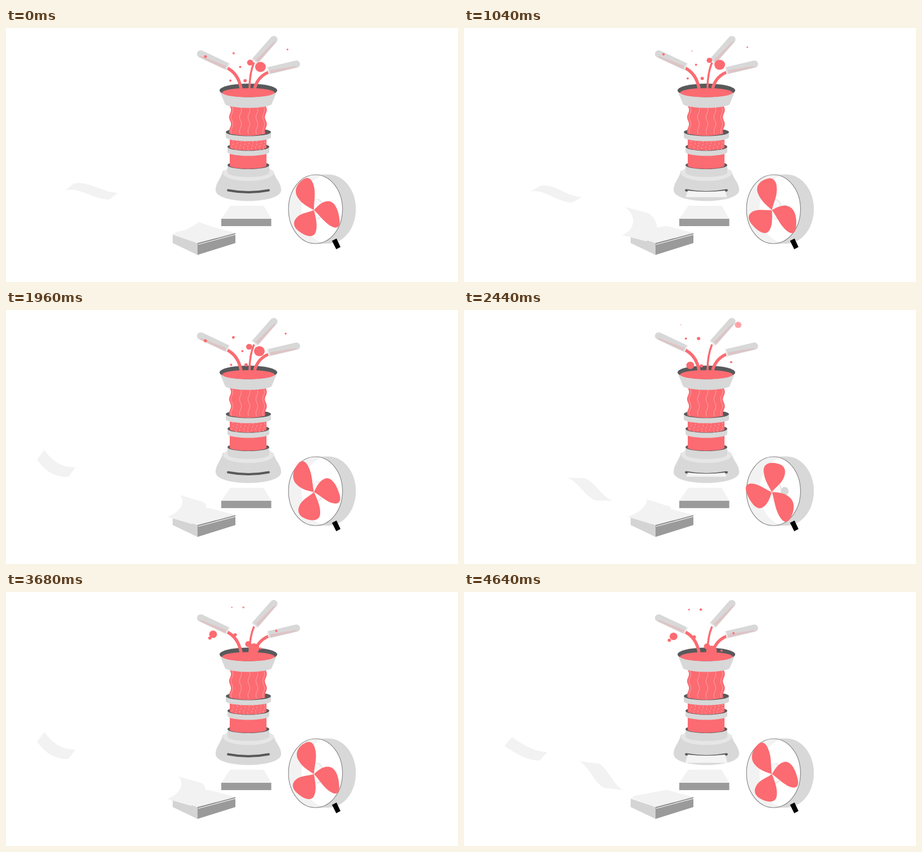
An HTML page with a canvas that plays this animation: 800 by 450 pixels, repeating every 4680 ms.

```html
<!DOCTYPE html>
<html>
<head>
<meta charset="utf-8">
<style>
  html, body { margin: 0; height: 100%; overflow: hidden; background: #fff; }
  canvas { display: block; }
</style>
</head>
<body>
<canvas id="stage" width="800" height="450"></canvas>
<script>
const ctx = document.getElementById('stage').getContext('2d');
const LOOP = 4680, DROP_CYCLE = 1000, PAPER_CYCLE = 1700, RISE_SPEED = 0.097;
const RED = '#fb6b71', GREY = '#d8d8d8', DARK = '#58595b', PAPER = '#f2f2f2';

const drops = [
  { start: 320, end: 1120, x: 472, drift: 36, r: 2 },
  { start: 450, end: 1120, x: 378, drift: -24, r: 3 },
  { start: 380, end: 900, x: 411, drift: -60, r: 7 },
  { start: 390, end: 1070, x: 424, drift: -20, r: 3 },
  { start: 560, end: 1160, x: 433, drift: 9, r: 5.5 },
  { start: 640, end: 1490, x: 438, drift: 52, r: 9.5 },
  { start: 890, end: 1740, x: 428, drift: -6, r: 3 },
  { start: 890, end: 1740, x: 401, drift: 1, r: 2 },
  { start: 640, end: 1480, x: 456, drift: -74, r: 2 }
];

// Poses of a sheet: four points of one edge, then the offset to the other edge
const poses = [
  { time: -860, shape: [356, 351, 340, 355, 320, 360, 297, 365, 44, 16] }, // flat on the pile
  { time: -300, shape: [285, 317, 310, 335, 300, 360, 280, 367, 42, 11] }, // curled up
  { time: -100, shape: [205, 300, 222, 310, 232, 340, 248, 347, 34, 4] },  // blown off
  { time: 360, shape: [105, 288, 130, 281, 155, 304, 183, 304, 15, -12] }, // gliding
  { time: 570, shape: [55, 265, 71, 288, 89, 296, 110, 296, 13, -17] }     // floating
];

const clamp = v => Math.max(0, Math.min(1, v));

function sheetShape(time) {
  const i = Math.max(1, poses.findIndex(p => p.time > time) + 1 || poses.length) - 1;
  const a = poses[Math.max(0, i - 1)], b = poses[Math.min(i, poses.length - 1)];
  const k = clamp((time - a.time) / (b.time - a.time || 1));
  return a.shape.map((v, j) => v + (b.shape[j] - v) * k);
}

function fill(path, color) {
  ctx.fillStyle = color;
  ctx.fill(new Path2D(path));
}

function line(path, color, width, cap = 'butt') {
  ctx.strokeStyle = color;
  ctx.lineWidth = width;
  ctx.lineCap = cap;
  ctx.stroke(new Path2D(path));
}

function oval(x, y, rx, ry, color) {
  ctx.beginPath();
  ctx.ellipse(x, y, rx, ry, 0, 0, Math.PI * 2);
  ctx.fillStyle = color;
  ctx.fill();
}

function tube(x, y, angle, length, side) {
  ctx.save();
  ctx.translate(x, y);
  ctx.rotate(angle);
  fill(`M0 -6.5H${length}V6.5H0A6.5 6.5 0 0 1 0 -6.5Z`, GREY);
  fill(`M3 ${side * 3}L${length - 3} 0V${side * 5.5}H0Z`, '#dec3c5');
  line(`M${length} -7V7`, '#ececec', 2);
  ctx.restore();
}

function wavyEdge(x, from, to) {
  const points = [], step = Math.sign(to - from);
  for (let y = from; y !== to + step; y += step)
    points.push(`${x + 1.7 * Math.sin((y - 139) * 0.25)} ${y}`);
  return points.join('L');
}

function ring(y, rx, ry) {
  const l = 429 - rx, r = 429 + rx;
  fill(`M${l} ${y}V${y + 9}A${rx} ${ry} 0 0 0 ${r} ${y + 9}V${y}Z`, GREY);
  oval(429, y, rx, ry, DARK);
}

function column(top, bottom) {
  fill(`M396 ${top}V${bottom}A33 6 0 0 0 461 ${bottom}V${top}Z`, RED);
}

function drawMachine(t) {
  // Base
  fill('M384 253C380 268 371 274 371 287C371 313 487 313 487 287C487 274 477 268 473 253Z', GREY);
  oval(429, 257, 45, 14, '#e6e6e6');
  ring(243, 37, 7);
  fill('M392 245V256A37 8 0 0 0 466 256V245A37 7 0 0 1 392 245Z', GREY);
  column(215, 244.5);
  ring(210.5, 37, 7);
  column(190, 212);

  ctx.save();
  ctx.setLineDash([3, 3]);
  for (let i = 0; i < 9; i++) {
    ctx.lineDashOffset = i * 2 - t * 0.024;
    line(`M${401 + i * 7} 199q3 5 0 9t0 9`, '#fdaeb1', 1);
  }
  ctx.restore();

  ring(184.5, 40, 7);
  fill(`M${wavyEdge(396.5, 135, 187)}Q429 195 460 187L${wavyEdge(460, 187, 135)}Z`, RED);
  for (const x of [400, 415, 430, 444, 456])
    line('M' + wavyEdge(x, 138, 188), '#fda0a4', 1);

  // Funnel
  fill('M378 111L388 135.500C402 143.500 456 143.500 470 135.500L480 111Z', GREY);
  oval(429, 110.5, 51, 12, DARK);
  oval(429, 114.5, 46.5, 8, RED);

  line('M393 287.500Q429 294.500 465 287.500', DARK, 4, 'round');
}

function drawTubes() {
  line('M390 70Q411 80 416 107', RED, 5.5);
  line('M439 61Q431 80 431 107', RED, 3.5);
  line('M466 78Q446 85 440 107', RED, 5.5);
  tube(344.5, 46, 0.44, 53, 1);
  tube(474, 20.5, 2.29, 51, -1);
  tube(514, 64, 2.91, 51, -1);
}

// Drops rise evenly and bow to the left on the way
function drawDrops(t) {
  for (const { start, end, x, drift, r } of drops) {
    for (const time of [t % DROP_CYCLE, t % DROP_CYCLE + DROP_CYCLE]) {
      if (time < start || time > end) continue;
      const k = (time - start) / (end - start);
      ctx.globalAlpha = clamp((end - time) / 80);
      const size = r * Math.min(1, 0.5 + (1 - k) * 2);
      oval(x + drift * k - 10 * Math.sin(Math.PI * k), 104 - RISE_SPEED * (time - start), size, size * 0.94, RED);
    }
  }
  ctx.globalAlpha = 1;
}

// A sheet slides slowly out of the slot, then drops onto the tray
function drawPrintout(t) {
  const time = t % PAPER_CYCLE;
  if (time > 660 && time < 1660) {
    const slide = clamp((time - 660) / 740), fall = clamp((time - 1400) / 260) ** 2;
    const top = 288 + 27 * fall, bottom = 294 + 11 * slide + 30 * fall;
    const a = 33 + (top - 288) * 0.3, b = 33 + (bottom - 288) * 0.3;
    fill(`M${429 - a} ${top}Q429 ${top + 4} ${429 + a} ${top}L${429 + b} ${bottom}H${429 - b}Z`, '#f4f4f4');
  }
  fill('M397 315H456L469.500 338H381Z', PAPER);
  fill('M381 338H469.500V351H381Z', '#9b9b9b');
}

function drawStack() {
  fill('M295 366L339 381V402L295 381Z', '#d4d4d4');
  fill('M339 381L406 363V381L339 402Z', '#9a9a9a');
  fill('M296 365L302 361L358 350.500L406 363L339 381Z', PAPER);
  line('M340 383.500L406 366', '#fff', 1);
  line('M339 381.500L372 373', '#777', 0.7);
}

function drawSheets(t) {
  for (const lift of [740, 1340]) {
    for (const cycle of [-1, 0, 1]) {
      const time = t % PAPER_CYCLE - lift + cycle * PAPER_CYCLE;
      if (time < poses[0].time || time > 820) continue;
      const [ax, ay, bx, by, cx, cy, ex, ey, dx, dy] = sheetShape(time);
      ctx.globalAlpha = clamp((820 - time) / 120);
      fill(`M${ax} ${ay}C${bx} ${by} ${cx} ${cy} ${ex} ${ey}L${ex + dx} ${ey + dy}` +
        `C${cx + dx} ${cy + dy} ${bx + dx} ${by + dy} ${ax + dx} ${ay + dy}Z`, PAPER);
    }
  }
  ctx.globalAlpha = 1;
}

function drawFan(t) {
  fill('M548 259.500H571A48 61 0 0 1 571 382H548Z', GREY);
  const face = new Path2D();
  face.ellipse(547.8, 321, 47.8, 61, 0, 0, Math.PI * 2);
  ctx.save();
  ctx.clip(face);
  oval(548, 321, 48, 61, PAPER);
  oval(571, 321, 48, 61, '#fff');
  oval(567.5, 321, 7, 7.5, GREY);
  oval(551, 321, 11, 18, GREY);
  oval(550, 321, 11, 17.5, '#f7f7f7');
  ctx.restore();
  ctx.strokeStyle = '#8a8a8a';
  ctx.lineWidth = 1.2;
  ctx.stroke(face);

  // Blades turn in a plane seen at a slant
  ctx.save();
  ctx.transform(0.8, 0, 0.17, 1, 545, 322.5);
  ctx.rotate(t / 1000 * Math.PI * 2);
  for (let i = 0; i < 3; i++) {
    fill('M0 0C10 -7 21 -16 35 -16C49 -16 55 0 53 18C52 29 45 33 36 30C20 25 11 9 0 0Z', RED);
    ctx.rotate(Math.PI * 2 / 3);
  }
  ctx.restore();
  oval(544, 322.5, 1.5, 1.5, '#fdb5b8');
  fill('M577 377L585 373L592 388L584.500 392Z', '#000');
}

function frame(now) {
  const t = now % LOOP;
  ctx.fillStyle = '#fff';
  ctx.fillRect(0, 0, 800, 450);
  drawMachine(t);
  drawTubes();
  drawDrops(t);
  drawPrintout(t);
  drawStack();
  drawSheets(t);
  drawFan(t);
  requestAnimationFrame(frame);
}
requestAnimationFrame(frame);
</script>
</body>
</html>
```
